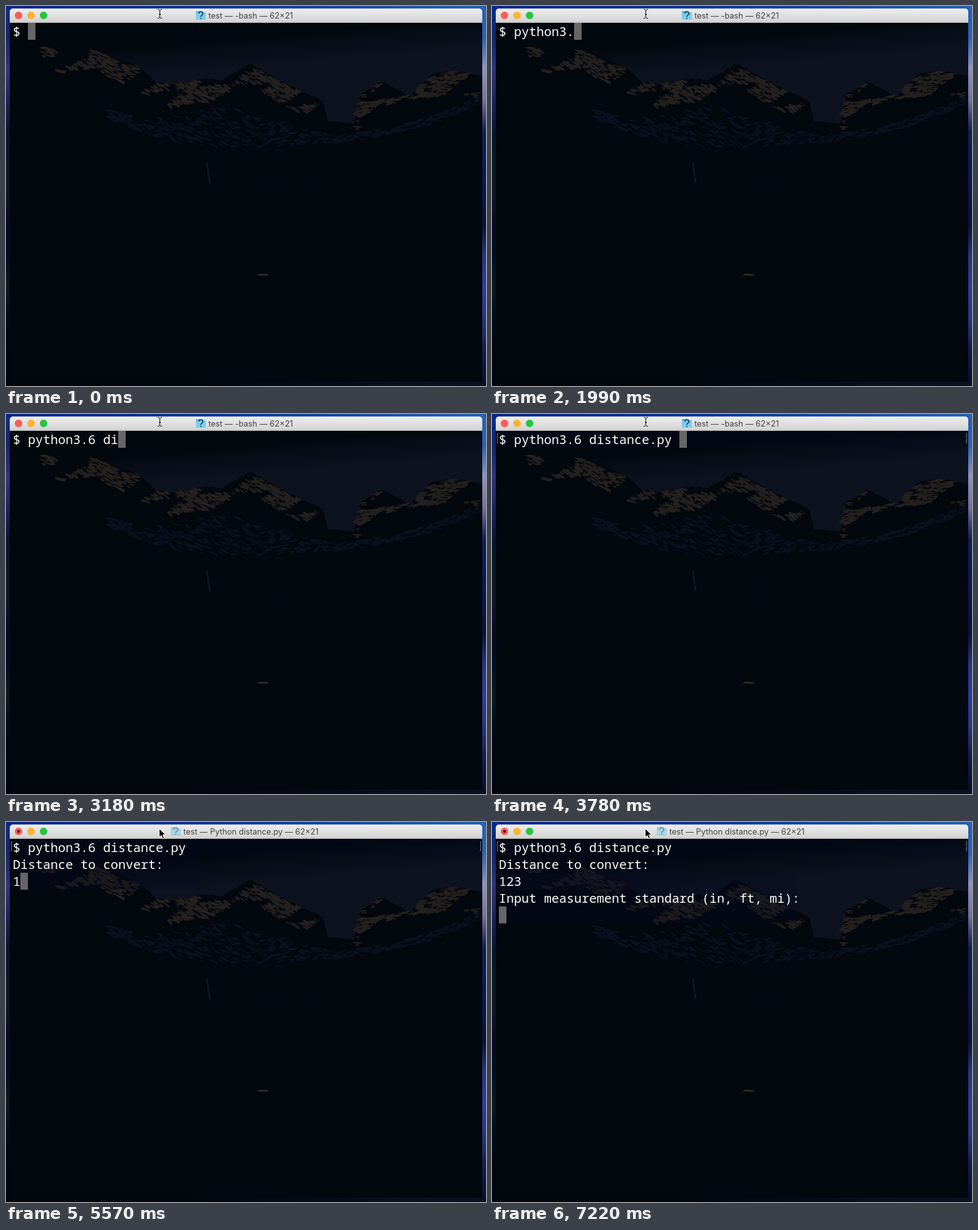
An HTML page with a canvas that plays this animation: 766x607 px, repeating every 8000 ms.

```html
<!DOCTYPE html>
<html lang="en">
<head>
<meta charset="utf-8">
<title>Terminal</title>
<style>
html, body { margin: 0; width: 100%; height: 100%; overflow: hidden; background: #03060d; }
#stage { position: relative; width: 766px; height: 607px; overflow: hidden; }
#stage > * { position: absolute; }
#bar { left: 6px; top: 4px; width: 754px; height: 23px; border-radius: 5px 5px 0 0;
  background: linear-gradient(#efefef, #d2d2d2 95%, #a9a9a9 96%); }
#title { top: 4px; font: 12.8px/23px Inter, sans-serif; color: #404040; white-space: pre; }
#term { left: 11px; top: 27px; margin: 0; font: 500 20px/27px "Noto Sans Mono", monospace;
  color: #fff; font-variant-ligatures: none; }
#cursor { width: 12px; height: 27px; background: #666; }
.mark { top: 31px; width: 2px; height: 15px; border: 1px solid #777; box-sizing: border-box; }
#markL { left: 8px; border-right: 0; }
#markR { left: 756px; border-left: 0; }
.tint { background: #080c24; opacity: .3; }
#tint1 { left: 8px; top: 27px; width: 750px; height: 27px; }
#tint2 { left: 11px; top: 54px; width: 300px; height: 54px; }
#tint3 { left: 11px; top: 81px; width: 476px; height: 81px; }
svg { left: 0; top: 0; }
</style>
</head>
<body>
<div id="stage">
  <canvas id="scene" width="766" height="607"></canvas>
  <div class="tint" id="tint1"></div>
  <div class="tint" id="tint2"></div>
  <div class="tint" id="tint3"></div>
  <div id="bar"></div>
  <div id="title"></div>
  <div id="cursor"></div>
  <div class="mark" id="markL"></div>
  <div class="mark" id="markR"></div>
  <pre id="term"></pre>
  <svg width="766" height="607">
    <circle cx="20" cy="15" r="6" fill="#fd5b56"/>
    <circle cx="40" cy="15" r="6" fill="#fdb42c"/>
    <circle cx="60" cy="15" r="6" fill="#29c540"/>
    <circle id="busy" cx="20" cy="15" r="2.2" fill="#4d0000"/>
    <g id="folder">
      <path d="M0 1.500q0-1.500 1.500-1.500h4l1.500 2h7q1.500 0 1.500 1.500v10h-15.500z" fill="#5bb9e6"/>
      <path d="M0 4h15.500v9.500h-15.500z" fill="#79cdf3"/>
      <path d="M4.800 4q0-3 3.200-3t3.200 3q0 1.700-1.800 2.900t-1.500 2.600M7.900 11v1.700" fill="none" stroke="#17384c" stroke-width="1.500"/>
    </g>
    <path id="beam" d="M242 5.500h2l1.500 1.500 1.500-1.500h2M245.500 7v11M242 19.500h2l1.500-1.500 1.500 1.500h2M244 13.500h3" fill="none" stroke="#000"/>
    <path id="arrow" d="M244.500 10.500v14l3.300-3 2.300 5 2.400-1-2.300-5h4.500z" fill="#000" stroke="#fff"/>
  </svg>
</div>
<script>
const $ = id => document.getElementById(id);
const g = $('scene').getContext('2d');
const ROCK = '#03070e', SNOW = '#25211f', SHADE = '#0a111f';

let seed = 11;
const rnd = () => (seed = seed * 16807 % 2147483647) / 2147483647;
const span = (a, b) => a + (b - a) * rnd();

function box(x, y, w, h, fill) { g.fillStyle = fill; g.fillRect(x, y, w, h); }

// Gradient of evenly spaced colours.
function fade(x0, y0, x1, y1, colors) {
  const f = g.createLinearGradient(x0, y0, x1, y1);
  const list = colors.split(' ');
  list.forEach((c, i) => f.addColorStop(i / (list.length - 1), c));
  return f;
}

// A pointed streak lying along a slope.
function fleck(x, y, angle, color) {
  g.save();
  g.translate(x, y);
  g.rotate(angle + span(-.3, .3));
  g.beginPath();
  g.ellipse(0, 0, span(2, 8), span(.6, 1.9), 0, 0, 7);
  g.fillStyle = color;
  g.fill();
  g.restore();
}

function desktop() {
  box(0, 0, 766, 30, fade(0, 0, 766, 0, '#08258c #0a38a0 #2562b6'));
  box(0, 6, 6, 601, fade(0, 0, 0, 600, '#0a2c92 #13256c #30367c #1c2660 #0a1330 #0d1721 #0d1721 #060b24 #060b22 #0b1c18 #040818 #03060f #03050c'));
  box(760, 6, 6, 601, fade(0, 0, 0, 600, '#2562b6 #2a63b8 #8d93c4 #75709f #0f2058 #0a1b5c #0a1750 #08123c #26368a #2c3f9f #26368c #121c50 #081030'));
  box(0, 600, 766, 7, fade(0, 0, 766, 0, '#03050c #03050c #070b18 #0a1024'));
}

const RIDGE = [[6, 45], [50, 57], [85, 72], [115, 62], [150, 72], [215, 98], [240, 122], [265, 125], [320, 115], [345, 118],
  [390, 91], [440, 120], [505, 150], [514, 184], [556, 187], [565, 142], [600, 120], [645, 144], [680, 108], [715, 103], [760, 111]];

function ridge(x) {
  const i = Math.max(1, RIDGE.findIndex(p => p[0] >= x));
  const [[x0, y0], [x1, y1]] = [RIDGE[i - 1], RIDGE[i]];
  return y0 + (y1 - y0) * (x - x0) / (x1 - x0);
}

function mountains() {
  box(6, 27, 754, 573, fade(479, 42, 483, 90, '#03070e #080e18 #0c131f'));

  g.beginPath();
  g.moveTo(6, 600);
  for (let x = 6; x <= 760; x += 2) g.lineTo(x, ridge(x) + span(-1, 2));
  g.lineTo(760, 600);
  g.fillStyle = ROCK;
  g.fill();

  // Snow in clumps just under the ridge, except in the valley.
  for (let i = 0; i < 1500; i++) {
    const x = span(60, 756), y = ridge(x) + span(2, 36);
    const valley = x > 500 && x < 560;
    const clump = Math.sin(x / 21) + Math.sin(y / 7 + x / 17);
    if (!valley && clump > -.1) fleck(x, y, x < 530 ? .45 : -.2, SNOW);
  }

  // Bluish slopes: a hanging band, thickest below the main peak.
  for (let i = 0; i < 520; i++) {
    const x = rnd() < .6 ? span(165, 450) : span(450, 756);
    const low = 225 - (x < 350 ? 45 * ((350 - x) / 185) ** 2 : 72 * ((x - 350) / 410) ** 3);
    const thick = 12 + 50 * Math.exp(-(((x - 350) / 110) ** 2));
    fleck(x, low - thick * rnd(), x < 400 ? .4 : -.25, SHADE);
  }

  for (let y = 250; y < 283; y++) box(319 + (y - 250) / 7, y, 3, 1, '#101620');
  for (let i = 0; i < 45; i++) box(span(402, 498), span(272, 294), span(1, 4), 1, '#080d18');
  for (let i = 0; i < 5; i++) fleck(410 + span(-4, 4), 429.5 + span(-1, 1), 0, '#2b2720');
}

desktop();
mountains();

const COMMAND = 'python3.6 distance.py ';
const KEYS = [500, 800, 1090, 1090, 1390, 1690, 1840, 1990, 2440, 2730, 3030, 3180, 3330, 3480];
const DIGITS = [5570, 5720, 5870];
const LOOP = 8000, COMPLETE = 3780, PROMPT = 4670, RUNNING = 4820, ANSWER = 7220;

const typed = (text, times, t) => text.slice(0, times.filter(k => k <= t).length);
const show = (id, on) => { $(id).style.visibility = on ? 'visible' : 'hidden'; };

function screen(t) {
  let text = '$ ' + (t < COMPLETE ? typed(COMMAND, KEYS, t) : COMMAND);
  if (t >= PROMPT) text += '\nDistance to convert:\n' + typed('123', DIGITS, t);
  if (t >= ANSWER) text += '\nInput measurement standard (in, ft, mi):\n';
  return text;
}

function draw(t) {
  const text = screen(t), lines = text.split('\n');
  $('term').textContent = text;
  $('cursor').style.left = 11 + 12 * lines.at(-1).length + 'px';
  $('cursor').style.top = 27 * lines.length + 'px';

  ['markL', 'markR', 'tint1'].forEach(id => show(id, t >= COMPLETE));
  show('tint2', t >= PROMPT);
  show('tint3', t >= ANSWER);
  show('beam', t < PROMPT);
  show('arrow', t >= PROMPT);

  const run = t >= RUNNING;
  show('busy', run);
  $('title').textContent = `test — ${run ? 'Python distance.py' : '-bash'} — 62×21`;
  $('title').style.left = (run ? 283 : 323) + 'px';
  $('folder').setAttribute('transform', `translate(${run ? 263 : 303} 8)`);
  $('folder').setAttribute('opacity', run ? .55 : 1);
}

function tick() {
  draw(performance.now() % LOOP);
  requestAnimationFrame(tick);
}
tick();
</script>
</body>
</html>
```
